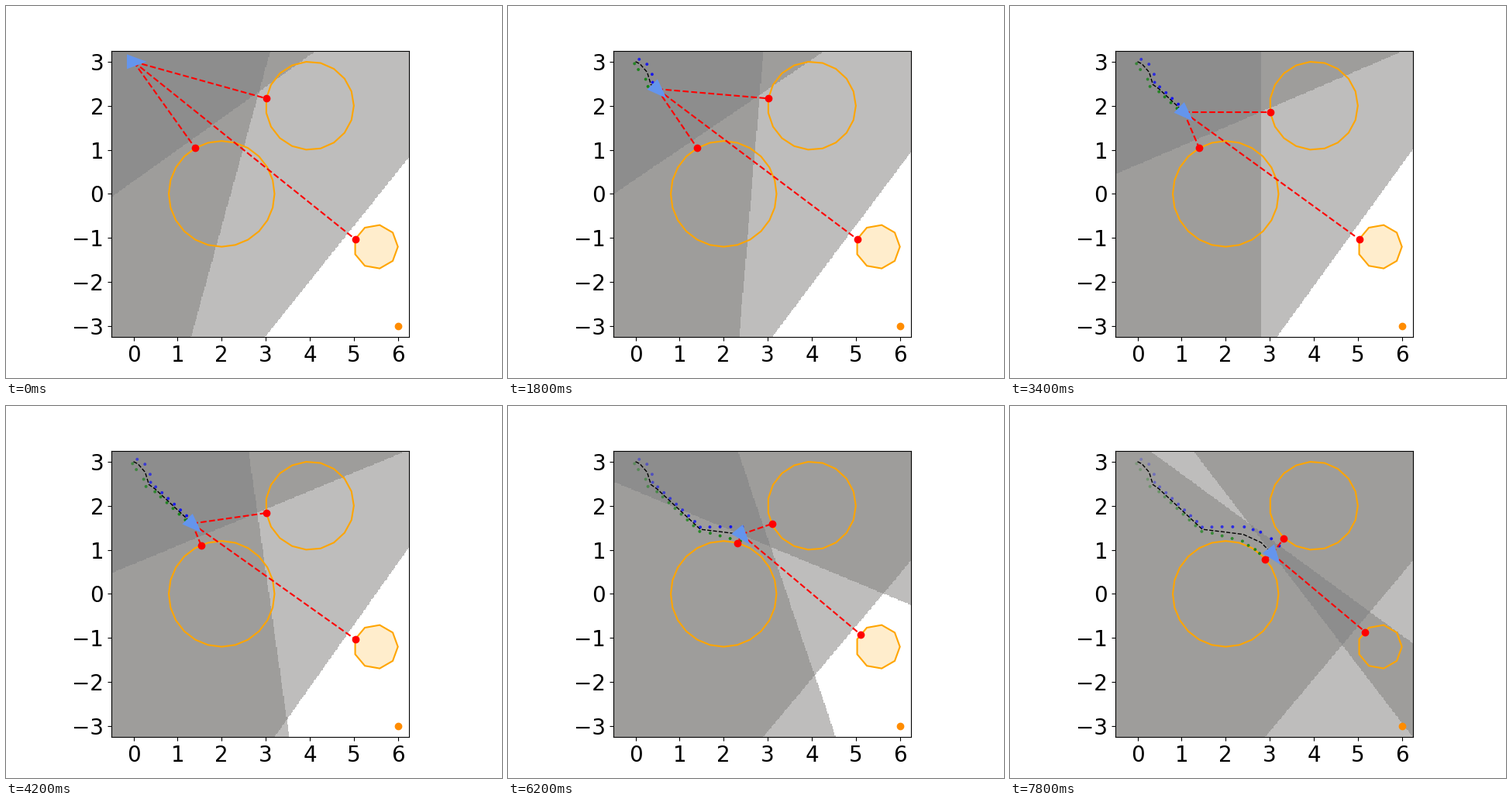
These frames come from a looping animation (640 by 480 pixels, 8000 ms). A matplotlib script:

```python
import numpy as np
import matplotlib.pyplot as plt
from matplotlib.animation import FuncAnimation
from matplotlib.colors import ListedColormap, to_rgb
from matplotlib.patches import Polygon

FRAMES = 40
GRID = 300
MARGIN = 0.2
X0, X1, Y0, Y1 = -0.5, 6.25, -3.25, 3.25
START, GOAL = (0, 3), np.array([6, -3])

# Waypoints of the walk: time, x, y, half the stance width.
WAY = np.array([
    (0, *START, .05), (2, .10, 2.95, .12), (4, .265, 2.76, .11),
    (7, .35, 2.48, .06), (9, .49, 2.38, .045), (23, 1.47, 1.465, .045),
    (27, 1.925, 1.41, .11), (31, 2.40, 1.35, .17), (36, 2.805, 1.165, .22),
    (39, 3.06, .905, .24)])


def ring(cx, cy, r, n):
    a = 2 * np.pi * np.arange(n) / n
    return np.column_stack([cx + r * np.cos(a), cy + r * np.sin(a)])


def nearest(p, poly):
    """Point on the outline of poly closest to p."""
    d = np.roll(poly, -1, axis=0) - poly
    t = np.clip(((p - poly) * d).sum(1) / (d * d).sum(1), 0, 1)
    q = poly + t[:, None] * d
    return q[np.argmin(np.hypot(*(q - p).T))]


time = np.arange(FRAMES)
x, y, width = (np.interp(time, WAY[:, 0], col) for col in WAY.T[1:])
body = np.column_stack([x, y])

# The robot turns to face the goal during its first steps.
ramp = np.minimum(time / 4, 1)
to_goal = GOAL - body
heading = ramp * np.arctan2(to_goal[:, 1], to_goal[:, 0])

# Feet alternate sides of the path; the right one lands further ahead.
left = time % 2 == 1
along = np.gradient(body, axis=0)
along /= np.hypot(*along.T)[:, None]
across = np.column_stack([-along[:, 1], along[:, 0]])
ahead = ramp * np.where(left, -.02, .12)
side = width * np.where(left, 1, -1)
feet = body + ahead[:, None] * along + side[:, None] * across
foot_rgb = np.where(left[:, None], to_rgb("blue"), to_rgb("green"))

obstacles = [ring(2, 0, 1.2, 24), ring(4, 2, 1, 19), ring(5.5, -1.2, .5, 9)]
ARROW = np.array([(.30, 0), (-.15, .167), (-.15, -.167)])
gx, gy = np.meshgrid(np.linspace(X0, X1, GRID), np.linspace(Y0, Y1, GRID))

fig, ax = plt.subplots(figsize=(6.4, 4.8), dpi=100)
ax.set_xlim(X0, X1)
ax.set_ylim(Y0, Y1)
ax.set_aspect("equal")
ax.set_xticks(range(7))
ax.set_yticks(range(-3, 4))
ax.tick_params(labelsize=20)

shades = ListedColormap([(1, 1, 1, 0), "#bebdbc", "#9e9d9b", "#8d8d8d"])
area = ax.imshow(np.zeros((GRID, GRID)), extent=(X0, X1, Y0, Y1),
                 origin="lower", cmap=shades, vmin=0, vmax=3,
                 interpolation="nearest", zorder=0)
for poly in obstacles:
    ax.add_patch(Polygon(poly, fc="orange", alpha=.2, lw=0, zorder=-1))
    ax.add_patch(Polygon(poly, fc="none", ec="orange", lw=1.5, zorder=1))
ax.plot(*GOAL, "o", color="darkorange", zorder=2)

trail, = ax.plot([], [], "k--", lw=1, zorder=2)
prints = ax.scatter([], [], s=8, linewidths=0, zorder=2.2)
rays = [ax.plot([], [], "r--", lw=1.5, zorder=2.4)[0] for _ in obstacles]
robot = ax.add_patch(Polygon(ARROW, fc="cornflowerblue", lw=0, zorder=3))
hits, = ax.plot([], [], "ro", zorder=4)


def draw(k):
    p = body[k]
    near = np.array([nearest(p, poly) for poly in obstacles])

    # Count the safe half-planes covering each cell.
    count = np.zeros((GRID, GRID))
    for q, ray in zip(near, rays):
        n = (p - q) / np.hypot(*(p - q))
        count += (gx - q[0]) * n[0] + (gy - q[1]) * n[1] >= MARGIN
        ray.set_data([p[0], q[0]], [p[1], q[1]])
    area.set_data(count)
    hits.set_data(near[:, 0], near[:, 1])

    past = slice(k + 1)
    trail.set_data(body[past, 0], body[past, 1])
    fade = .9 - .018 * (k - time[past])
    prints.set_offsets(feet[past])
    prints.set_facecolors(np.column_stack([foot_rgb[past], fade]))

    c, s = np.cos(heading[k]), np.sin(heading[k])
    robot.set_xy(p + ARROW @ np.array([[c, s], [-s, c]]))
    return [area, trail, prints, robot, hits, *rays]


anim = FuncAnimation(fig, draw, frames=FRAMES, interval=200, repeat=True,
                     repeat_delay=0)
plt.show()
```
